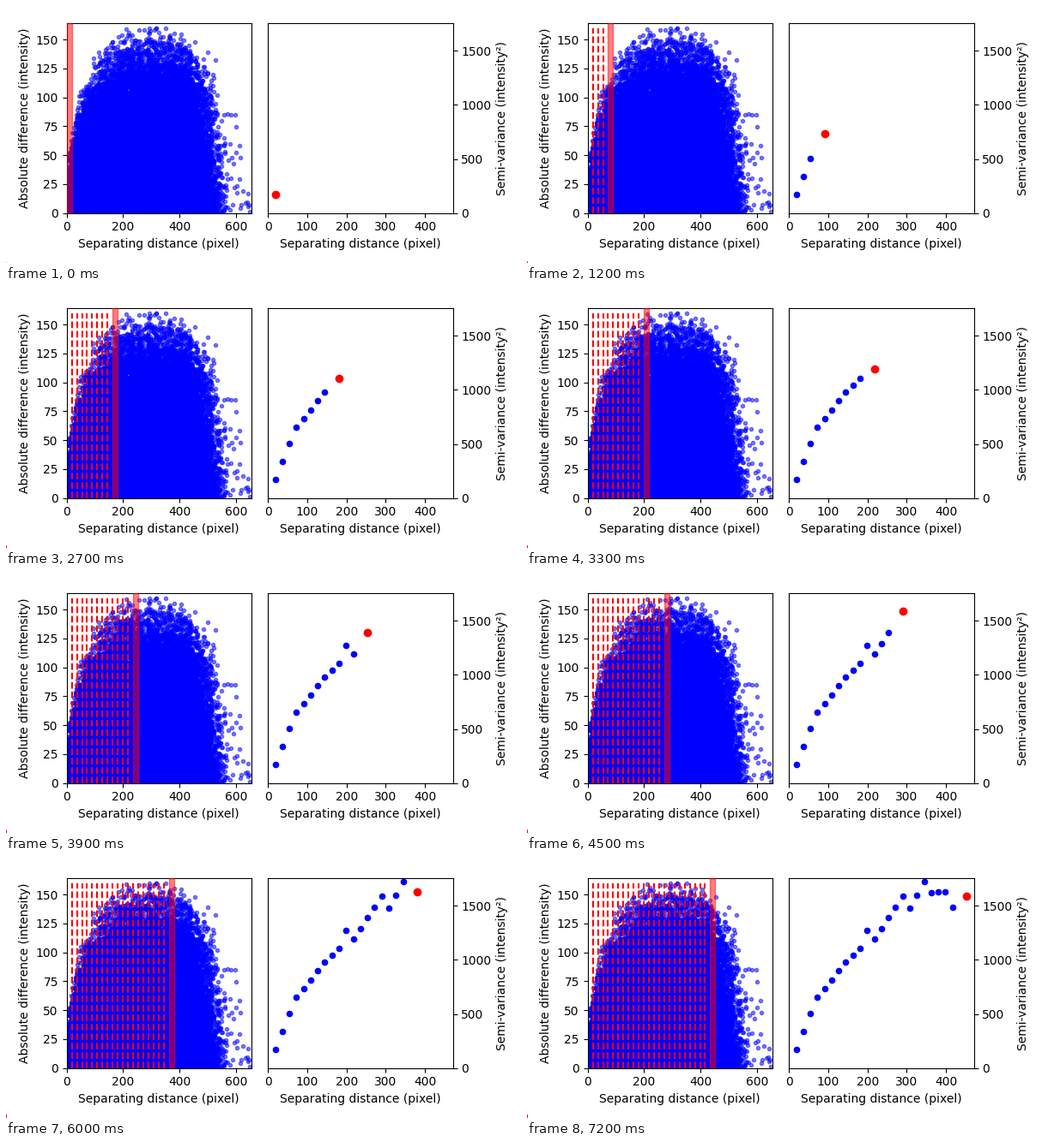
A matplotlib script that plays this animation: 600 px wide and 300 px high, repeating every 7.5 s.

```python
import numpy as np
import matplotlib.pyplot as plt
from matplotlib.animation import FuncAnimation
from matplotlib.patches import Rectangle

W, H, DPI = 600, 300, 100
FRAMES, INTERVAL = 25, 300
STEP = 18.1
PEAK = 159.6
RADIUS = 310
OVER_FRAME = 3  # above the axes frame

plt.rcParams["font.family"] = "DejaVu Sans"
rng = np.random.default_rng(7)


def cloud_top(dist):
    """Largest difference at a distance: a superellipse arch."""
    u = np.abs(dist / RADIUS - 1)
    return 1.05 * PEAK * (1 - u ** 2.5) ** 0.4


def make_cloud(n=56000, strays=18):
    dist = rng.uniform(0, 2 * RADIUS, n)
    top = cloud_top(dist)
    tail = np.clip((2 * RADIUS - dist) / 200, 0, 1) ** 3
    keep = rng.random(n) < tail * top / PEAK
    dist, top = dist[keep], top[keep]
    diff = top * (1 - rng.random(dist.size) ** 0.37)

    far = rng.uniform(590, 650, strays)
    far_diff = rng.random(strays) * 1.5 * (655 - far)
    return (np.append(dist, far),
            np.append(np.minimum(diff, PEAK), far_diff))


def make_variogram():
    lag = np.arange(1, FRAMES + 1)
    knots = [1, 3, 4, 8, 10, 11, 12, 16, 17, 19, 20, 22, 23, 25]
    values = [170, 502, 653, 977, 1103, 1269, 1190, 1586, 1475, 1721,
              1622, 1625, 1483, 1590]
    return STEP * lag, np.interp(lag, knots, values)


lags, semivar = make_variogram()

fig, (left, right) = plt.subplots(1, 2, figsize=(W / DPI, H / DPI), dpi=DPI,
                                  facecolor="white")
left.set(xlim=(0, 655), ylim=(0, 163.9),
         xlabel="Separating distance (pixel)",
         ylabel="Absolute difference (intensity)")
right.set(xlim=(0, 471), ylim=(0, 1752),
          xlabel="Separating distance (pixel)",
          ylabel="Semi-variance (intensity²)")
right.yaxis.tick_right()
right.yaxis.set_label_position("right")
fig.tight_layout()

left.plot(*make_cloud(), ".", color="blue", ms=6, alpha=0.5, zorder=1)
dashes = [left.vlines(lag, 0, PEAK, colors="red", linestyles="--", lw=1.5,
                      zorder=OVER_FRAME) for lag in lags]
band = left.axvspan(0, STEP, color="red", alpha=0.5, zorder=OVER_FRAME)

past, = right.plot([], [], "o", color="blue", ms=4.5)
current, = right.plot([], [], "o", color="red", ms=6)

# Thin red sliver in the bottom left corner, as tall as the semi-variance
sliver = fig.add_artist(Rectangle((0, 0), 1 / W, 0, transform=fig.transFigure,
                                  color="red", lw=0, snap=False))


def update(i):
    done = max(i - 1, 0)
    for k, dash in enumerate(dashes):
        dash.set_visible(k < done)
    band.set_x(i * STEP)
    past.set_data(lags[:done], semivar[:done])
    current.set_data(lags[i:i + 1], semivar[i:i + 1])
    sliver.set_height(semivar[i] / 400 / H)
    return [*dashes, band, past, current, sliver]


anim = FuncAnimation(fig, update, frames=FRAMES, interval=INTERVAL,
                     init_func=lambda: update(0), repeat=True,
                     repeat_delay=0, blit=False)
plt.show()
```
